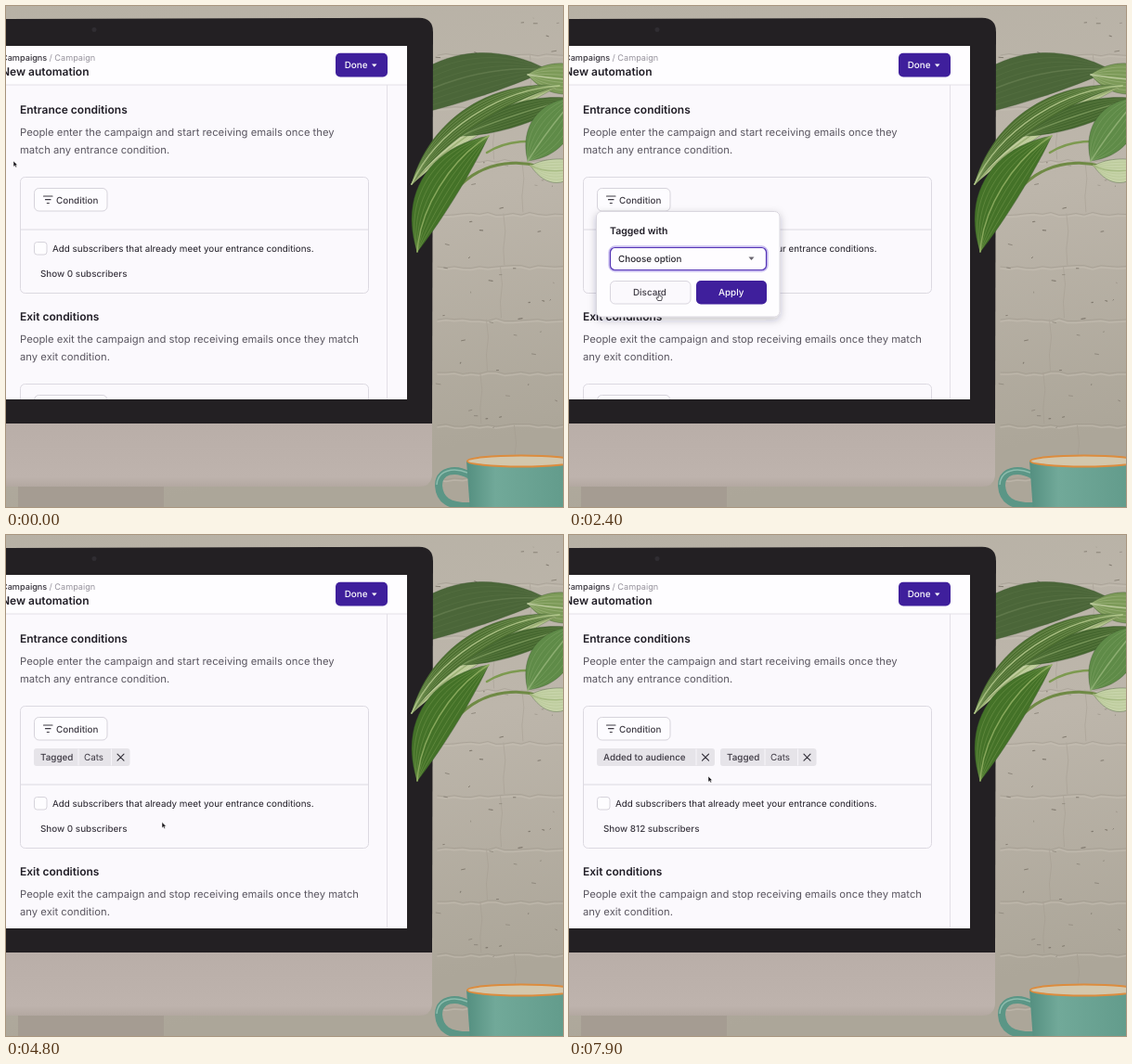
Recreate the animation shown at these times as an HTML page. Size 600x540 px, loop 8 s.

```html
<!DOCTYPE html>
<html lang="en">
<head>
<meta charset="utf-8">
<title>New automation</title>
<style>
  html, body { margin: 0; width: 100%; height: 100%; overflow: hidden; background: #b9b2a6; }
  svg { display: block; width: 100%; height: 100%; font-family: Inter, Roboto, sans-serif; }
  text { white-space: pre; text-rendering: geometricPrecision; }
</style>
</head>
<body>
<svg id="stage" viewBox="0 0 600 540">
  <defs>
    <linearGradient id="wall" x1="0" y1="0" x2=".2" y2="1">
      <stop offset="0" stop-color="#b7b1a5"/><stop offset=".5" stop-color="#bdb6ab"/><stop offset="1" stop-color="#aca699"/>
    </linearGradient>
    <linearGradient id="chin" x1="0" y1="0" x2="0" y2="1">
      <stop offset="0" stop-color="#b9aea8"/><stop offset=".85" stop-color="#beb3ad"/><stop offset="1" stop-color="#b3a8a1"/>
    </linearGradient>
    <linearGradient id="mug">
      <stop offset="0" stop-color="#548f80"/><stop offset=".3" stop-color="#71a999"/><stop offset="1" stop-color="#639c8c"/>
    </linearGradient>
    <filter id="shadow" x="-20%" y="-20%" width="140%" height="150%">
      <feDropShadow dx="0" dy="3" stdDeviation="4" flood-color="#221b33" flood-opacity=".25"/>
    </filter>
    <filter id="blur" x="-50%" y="-100%" width="200%" height="300%"><feGaussianBlur stdDeviation="6"/></filter>
    <clipPath id="screenClip"><rect y="43" width="432" height="381"/></clipPath>
    <clipPath id="contentClip"><rect y="85" width="432" height="339"/></clipPath>
    <clipPath id="listClip"><rect x="41" y="264" width="169" height="175" rx="4"/></clipPath>
  </defs>
  <rect width="600" height="540" fill="url(#wall)"/>
  <g id="bricks" fill="none" stroke-linecap="round"></g>
  <g id="backLeaf"></g>
  <rect x="13" y="516" width="157" height="24" fill="#a59c92"/>
  <path d="M0 518H445Q459 518 459 504V449H0Z" fill="url(#chin)"/>
  <path d="M0 14L445 12.800Q460 13 460 28L459 450H0Z" fill="#232023"/>
  <circle cx="95" cy="25.500" r="2.500" fill="#302d32"/>
  <g clip-path="url(#screenClip)">
    <rect y="43" width="432" height="381" fill="#fbf9fd"/>
    <rect y="43" width="432" height="42" fill="#fefdff"/>
    <path d="M0 85H432M410.500 85V424" stroke="#e3e0e7" fill="none"/>
    <g id="screen"></g>
  </g>
  <g id="plant"></g>
  <path d="M500 506C484 497 466 500 466 517C467 532 476 540 503 539" fill="none" stroke="#5b9686" stroke-width="8"/>
  <path d="M497 503C482 497 465 500 464 516" fill="none" stroke="#8dbdae" stroke-width="1.500"/>
  <path d="M496 490L500 545H600V490Z" fill="url(#mug)"/>
  <ellipse cx="555" cy="490.500" rx="58" ry="6" fill="#d3c7ac" stroke="#dc8c3e" stroke-width="2"/>
</svg>
<script>
const LOOP = 8000, STEP = 100;
const PURPLE = '#3f1f9c', INK = '#201d26', GRAY = '#5a5660', EDGE = '#dcd9e1';
const BODY = 11.27, SMALL = 9.85;
const el = id => document.getElementById(id);

const text = (x, y, label, size = SMALL, weight = 500, fill = '#3d3943') =>
  `<text x="${x}" y="${y}" font-size="${size}" font-weight="${weight}" fill="${fill}">${label}</text>`;
const box = (x, y, w, h, r, fill, stroke = 'none', extra = '') =>
  `<rect x="${x}" y="${y}" width="${w}" height="${h}" rx="${r}" fill="${fill}" stroke="${stroke}" ${extra}/>`;
const line = (d, color = EDGE, width = 1) =>
  `<path d="${d}" fill="none" stroke="${color}" stroke-width="${width}" stroke-linecap="round" stroke-linejoin="round"/>`;
const move = (x, y, inner) => `<g transform="translate(${x} ${y})">${inner}</g>`;

// ---- Scenery ----
let seed = 11;
const random = (lo, hi) => {
  seed = (seed * 16807) % 2147483647;
  return lo + (hi - lo) * seed / 2147483647;
};

function drawBricks() {
  let out = '';
  for (let y = 53; y < 540; y += 57) {
    let joint = `M465 ${y}`;
    for (let x = 465; x < 600; x += 9) joint += `L${x + 9} ${y + random(-1.5, 1.5)}`;
    const x = random(490, 580);
    out += `<g opacity=".45">${line(joint, '#999286')}${move(0, 2, line(joint, '#cbc4b8', 1.5))}`
      + `${line(`M${x} ${y}l2 19l-2 19l1 17`, '#a29a8e')}</g>`;
  }
  for (let i = 0; i < 60; i++)
    out += line(`M${random(462, 598)} ${random(10, 480)}l${random(0, 5)} ${random(-1, 1)}`, '#827b70', random(.4, 1.2));
  return out;
}

// A blade along base-tip; both edges and all veins share one curve with a varying sideways offset.
function leaf([bx, by], [tx, ty], bow, half, fill, vein) {
  const dx = tx - bx, dy = ty - by, len = Math.hypot(dx, dy);
  const control = (along, offset) =>
    `${(bx + dx * along + dy / len * -offset).toFixed(1)} ${(by + dy * along + dx / len * offset).toFixed(1)}`;
  const rib = k => `C${control(.3, bow + half * k)} ${control(.72, bow + half * k)} ${tx} ${ty}`;
  const back = `C${control(.72, bow - half)} ${control(.3, bow - half)} ${bx} ${by}Z`;
  let out = `<path d="M${bx} ${by}${rib(1)}${back}" fill="${fill}" stroke="#34502a" stroke-opacity=".5" stroke-width=".7"/>`;
  for (let k = -.75; k < 1; k += .25)
    out += `<g opacity="${k ? .4 : .85}">${line(`M${bx} ${by}${rib(k)}`, vein, k ? .8 : 1.5)}</g>`;
  return out;
}

el('bricks').innerHTML = drawBricks();
el('backLeaf').innerHTML = leaf([584, 69], [400, 125], 25, 33, '#4b6639', '#637c4e');
el('plant').innerHTML = line('M600 184C560 160 512 165 482 201', '#6f8a45', 3)
  + line('M600 148C565 144 540 144 518 158', '#7d9a50', 2.5)
  + leaf([640, 80], [562, 74], -2, 22, '#7c9a58', '#c3d0a5')
  + leaf([622, 170], [565, 172], -9, 17, '#c6d3a8', '#a3b87d')
  + leaf([596, 86], [437, 192], 14, 8, '#c9d5a6', '#93aa6b')
  + leaf([612, 100], [490, 140], 4, 16, '#45672f', '#7d9b5d')
  + leaf([614, 98], [562, 167], 2, 28, '#5f8b48', '#93b377')
  + leaf([596, 86], [437, 192], 33, 14, '#4d7031', '#b5c98e')
  + leaf([520, 140], [443, 265], 22, 27, '#447228', '#93b164');

// ---- Interface ----
const ROW = 25.3, MENU_TOP = 252.6, OPTION_ROW = 14.5, LIST_TOP = 266.5;
const diamond = (x, y) => `M${x} ${y - 2}l2 2l-2 2l-2 -2z`;
const ITEMS = [
  ['Signs up for product', 'M-4 -2.500h8v7h-8zM-2 -2v-3h4v3'],
  ['Waitlists for product', 'M-4 -4.500h8v9h-8zM-2 -2h4m-4 2h4m-4 2h4'],
  ['Joins community', diamond(0, -3) + diamond(0, 3) + diamond(-3, 0) + diamond(3, 0)],
  ['Tagged with', 'M-4.500 -4.500h4.500l5 5l-4.500 4.500l-5 -5zM-2 -2v.1'],
  ['Added to audience', 'M0 -5c4 0 3.500 5 1.500 6.500q3 .5 3 3h-9q0 -2.500 3 -3c-2 -1.500 -2.500 -6.500 1.500 -6.500z']
];
const OPTIONS = ['Choose option', 'BASE jumping', 'Booking', 'Cats', 'Dogs', 'Email form', 'Embedded',
  'Ostrenwick', 'Gardening', 'Humor', 'Launch Community'];

const header = text(-5, 59, 'Campaigns', 9.14, 500, '#37333c')
  + text(46.5, 59, '/ Campaign', 9.14, 400, '#96929c')
  + text(-5, 75, 'New automation', 12, 600, INK)
  + box(355, 50.8, 56, 25.6, 5, PURPLE) + text(364.7, 67, 'Done', SMALL, 500, '#fff')
  + '<path d="M394 62.500h5.500l-2.750 3.200z" fill="#fff"/>';

const section = (y, title, first, second) => text(15, y, title, 12, 600, INK)
  + text(15, y + 23.5, first, BODY, 400, GRAY) + text(15, y + 43, second, BODY, 400, GRAY);

const conditionButton = (y, fill = '#fdfcff') => box(30.5, y, 78.5, 24.5, 5, fill, '#d6d3db')
  + line(`M40.500 ${y + 8.5}h9.500m-7.500 3.700h5.500m-3.700 3.800h2`, '#3d3943', 1.2)
  + text(54, y + 16, 'Condition');

function tag(x, label, width, value) {
  const end = x + width;
  return box(x, 230, width, 19, 3, '#e6e4e9') + text(x + 7, 243.3, label)
    + (value ? line(`M${x + 48} 231v17`, '#f7f5fa') + text(x + 54, 243.3, value, SMALL, 400) : '')
    + line(`M${end - 20} 231v17`, '#f7f5fa')
    + line(`M${end - 13.5} 236.200l7 7m0 -7l-7 7`, '#2d2a33', 1.1);
}

function page({ tags, count, ring, hovered }) {
  const shift = tags ? 28 : 0;
  const lower = line('M16 241H390') + box(30.5, 254.5, 13.5, 13.5, 3, '#fefdff', '#d6d3db')
    + text(50, 265, 'Add subscribers that already meet your entrance conditions.', SMALL, 400, INK)
    + text(37, 291.5, `Show ${count} subscribers`)
    + section(339.3, 'Exit conditions', 'People exit the campaign and stop receiving emails once they match', 'any exit condition.')
    + box(15.5, 407.5, 375, 125, 5, 'none', EDGE) + conditionButton(419.5);
  return '<g clip-path="url(#contentClip)">'
    + section(116, 'Entrance conditions', 'People enter the campaign and start receiving emails once they', 'match any entrance condition.')
    + box(15.5, 184.5, 375, 125 + shift, 5, 'none', EDGE)
    + (ring ? box(29, 195, 81.5, 27, 6, 'none', '#c9c6cf', 'stroke-width="2"') : '')
    + conditionButton(196.5, hovered ? '#e9e7ec' : undefined)
    + tags + move(0, shift, lower) + '</g>';
}

const popover = (w, h) => box(29.5, 221.5, w, h, 5.5, '#fefdff', '#d9d6de', 'filter="url(#shadow)"');

function menu(active) {
  let out = popover(180.5, 163) + text(44, 243.5, 'Add condition', 10.5, 600, INK);
  ITEMS.forEach(([label, icon], i) => {
    const y = MENU_TOP + (i + .5) * ROW;
    if (i === active) out += box(36, y - ROW / 2, 168.5, ROW, 4, '#ebeaed');
    out += move(49.5, y, line(icon, '#2d2a33', 1.1)) + text(60.5, y + 3.5, label, SMALL, 500, '#2b2831');
  });
  return out;
}

const tagForm = value => popover(197.5, 113.5) + text(44, 246.3, 'Tagged with', 10.5, 600, INK)
  + box(43.5, 259.5, 170, 26, 6, 'none', '#c9bdf0', 'stroke-width="2.400"')
  + box(44.5, 260.5, 168, 24, 5, '#fefdff', '#5434b5', 'stroke-width="1.200"')
  + text(53, 275.5, value, SMALL, 500, '#2b2831') + '<path d="M193.500 270.500h6l-3 3.600z" fill="#67636d"/>'
  + box(44.5, 296.5, 86.5, 24.5, 5, '#fbf9fd', '#d9d6de') + text(69, 312, 'Discard')
  + box(137, 296, 76, 25.5, 5, PURPLE) + text(161, 312, 'Apply', SMALL, 500, '#fff');

function optionList(active) {
  let out = box(41, 264, 169, 175, 4, '#515052') + box(142, 295, 76, 25, 5, '#25135f', 'none', 'filter="url(#blur)"');
  OPTIONS.forEach((label, i) => {
    const y = LIST_TOP + i * OPTION_ROW;
    if (i && i === active) out += box(42, y, 167, OPTION_ROW, 0, '#2a76d2');
    out += text(50.5, y + 10.5, label, 8.95, 400, i ? '#f4f2f5' : '#97949a');
  });
  return `<g clip-path="url(#listClip)">${out}${line('M44.500 274l1.200 1.500l2 -3.500', '#97949a', .7)}</g>`;
}

// ---- Story: one click every 900 ms ----
const [OPEN, PICK, LIST, CHOOSE, APPLY, REOPEN, ADD] = [...Array(7).keys()].map(i => 1100 + 900 * i);

const onItem = i => [87, MENU_TOP + (i + .7) * ROW + 2];
const start = [8, 167], button = [75, 211], select = [105, 273], discard = [97, 309.5];
const cats = [94.5, LIST_TOP + 3 * OPTION_ROW + 2], apply = [168, 309.5], title = [79.5, 231], rest = [150, 260];

// Each stop: arrival, place, departure.
const STOPS = [
  [0, start, 0], [900, button, OPEN], [1500, onItem(2), 1500], [1800, onItem(3), PICK],
  [2400, discard, 2400], [2700, select, LIST], [3500, cats, CHOOSE], [4300, apply, 4800],
  [5400, button, 5700], [6000, title, 6000], [6400, onItem(4), ADD + 200], [7900, rest, LOOP]
];

function pointerAt(t) {
  const next = STOPS.findIndex(([arrive]) => arrive > t);
  if (next < 0) return rest;
  const [, from, leave] = STOPS[next - 1], [arrive, to] = STOPS[next];
  const k = Math.max(0, (t - leave) / (arrive - leave)), ease = k * k * (3 - 2 * k);
  return from.map((v, i) => v + (to[i] - v) * ease);
}

const ARROW = '<path d="M0 0v6.200l1.500 -1.300l1 2.100l1.100 -.5l-.9 -2h1.800z" fill="#17151a" stroke="#fff" stroke-width=".5"/>';
const HAND = '<path d="M-.8 .6q.8 -1.100 1.600 0v2.400l2.200 .6q.6 .4 .2 1.900l-.6 2.500h-3.900l-1.700 -3q.4 -1 2.200 0z" fill="#fff" stroke="#2d2a33" stroke-width=".8"/>';

function render(t) {
  const [x, y] = pointerAt(t);
  const inside = (l, top, r, b) => x >= l && x <= r && y >= top && y <= b;
  const during = (from, to) => t >= from && t < to;
  const menuOpen = during(OPEN, PICK) || during(REOPEN, ADD);
  const formOpen = during(PICK, APPLY), listOpen = during(LIST, CHOOSE);
  const overButton = inside(30, 196, 109, 221);
  const item = inside(36, MENU_TOP, 204, MENU_TOP + 5 * ROW) ? Math.floor((y - MENU_TOP) / ROW) : -1;

  const added = t >= ADD;
  const tags = (added ? tag(30, 'Added to audience', 127) : '')
    + (t >= APPLY ? tag(added ? 163 : 30, 'Tagged', 103.5, 'Cats') : '');

  let out = page({ tags, count: added ? 812 : 0, ring: menuOpen, hovered: overButton || (menuOpen && item < 0) });
  if (menuOpen) out += menu(item);
  if (formOpen) out += tagForm(t < CHOOSE ? 'Choose option' : 'Cats');
  if (listOpen) out += optionList(Math.floor((y - LIST_TOP) / OPTION_ROW));

  const hand = overButton || (menuOpen && item >= 0) || (formOpen && !listOpen && inside(44, 296, 213, 321));
  el('screen').innerHTML = out + header + move(x.toFixed(1), y.toFixed(1), hand ? HAND : ARROW);
}

let began, shown = -1;
function tick(now) {
  began ??= now;
  const t = Math.floor(((now - began) % LOOP) / STEP) * STEP;
  if (t !== shown) render(shown = t);
  requestAnimationFrame(tick);
}
render(0);
requestAnimationFrame(tick);
</script>
</body>
</html>
```
